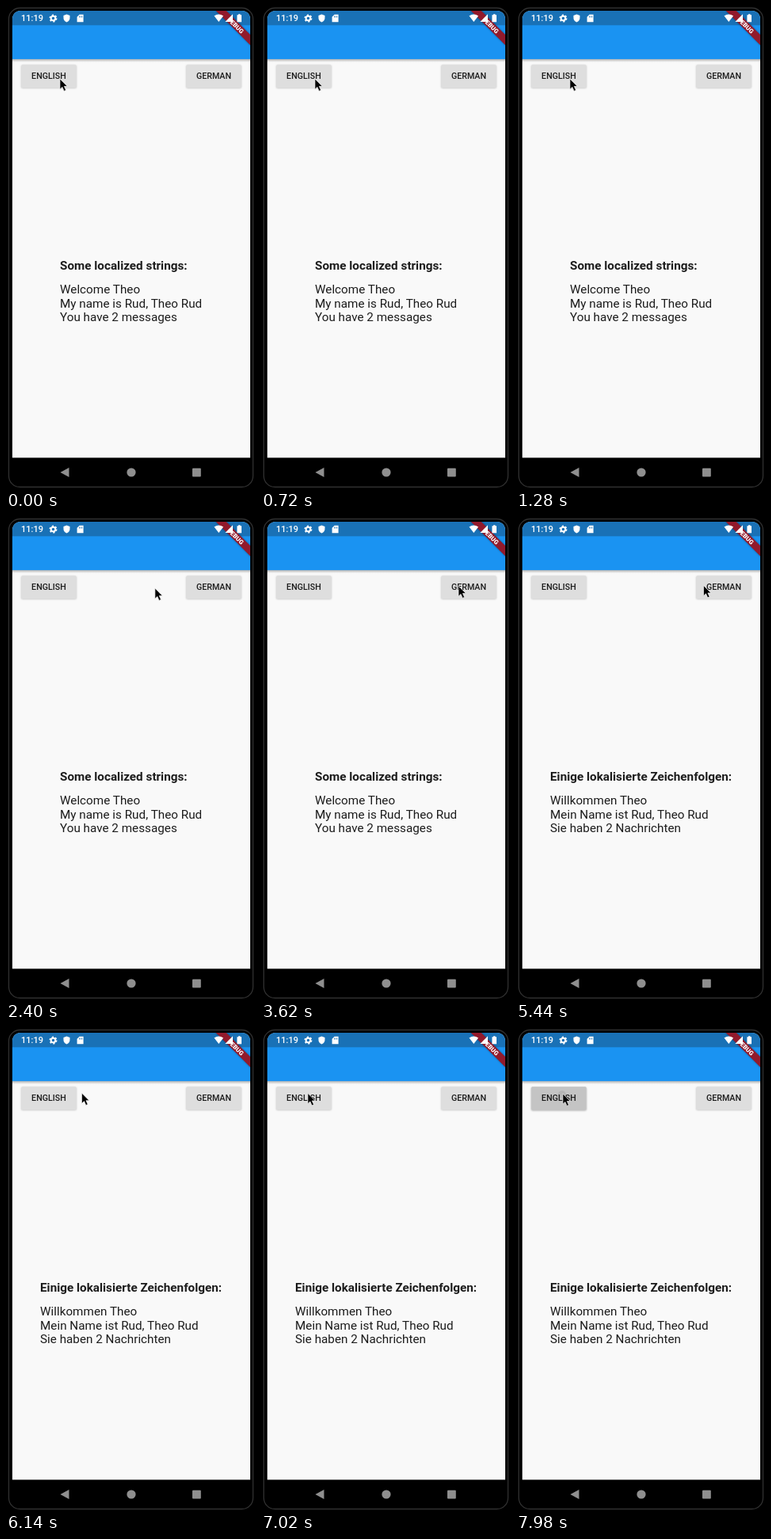
An HTML page for the animation above (8000 ms loop, 314 by 610 pixels).

```html
<!DOCTYPE html>
<html lang="en">
<head>
<meta charset="utf-8">
<style>
  html, body { margin: 0; width: 100%; height: 100%; overflow: hidden; background: #000; }
  svg { display: block; width: 314px; height: 610px; font-family: Roboto, sans-serif; }
  .label { font-size: 10.7px; font-weight: 500; fill: #1c1c1c; text-anchor: middle; }
  .body { font-size: 15.28px; fill: #1c1c1c; }
  .body .head { font-weight: 700; }
</style>
</head>
<body>
<svg viewBox="0 0 314 610">
  <defs>
    <clipPath id="screen"><path d="M8 570.6V18q0-12 12-12H296q12 0 12 12V570.6z"/></clipPath>
    <clipPath id="buttons"><path d="M19.3 74.2h69.4v29h-69.4zM227.3 74.2h69.4v29h-69.4z"/></clipPath>
    <linearGradient id="fall" x2="0" y2="1">
      <stop stop-color="#000" stop-opacity=".28"/><stop offset="1" stop-color="#000" stop-opacity="0"/>
    </linearGradient>
    <filter id="soft" x="-20%" y="-40%" width="140%" height="180%"><feGaussianBlur stdDeviation="1.1"/></filter>
  </defs>
  <rect width="314" height="610" fill="#000"/>
  <rect x="3.5" y="2.5" width="308" height="605" rx="14" fill="none" stroke="#303030" stroke-width="1.3"/>

  <g clip-path="url(#screen)">
    <rect x="8" y="6" width="300" height="565" fill="#f9f9f9"/>
    <rect x="8" y="67" width="300" height="4" fill="url(#fall)"/>
    <rect x="8" y="6" width="300" height="61.1" fill="#1a93f2"/>
    <rect x="8" y="6" width="300" height="18.3" fill="#1971b6"/>
  </g>

  <g id="pads"></g>
  <g clip-path="url(#buttons)" id="splashes"></g>
  <g class="label"><text x="54" y="92.4">ENGLISH</text><text x="262" y="92.4">GERMAN</text></g>
  <g class="body" id="strings">
    <text class="head" y="333.2"></text>
    <text y="363.3"></text>
    <text y="380.8"></text>
    <text y="398.3"></text>
  </g>

  <g clip-path="url(#screen)">
    <g transform="translate(308 6) rotate(45)">
      <rect x="-31" y="21.4" width="62" height="9.2" fill-opacity=".4" filter="url(#soft)"/>
      <rect x="-31" y="21.4" width="62" height="9.2" fill="#921a2c"/>
      <text y="28.9" text-anchor="middle" font-size="7.8" font-weight="900" fill="#fff">DEBUG</text>
    </g>
  </g>

  <g fill="#fff">
    <text x="19" y="19.4" font-size="11" font-weight="500">11:19</text>
    <circle cx="59.5" cy="15.5" r="2.8" fill="none" stroke="#fff" stroke-width="2"/>
    <circle cx="59.5" cy="15.5" r="4.2" fill="none" stroke="#fff" stroke-width="1.6" stroke-dasharray="2.2 2.2"/>
    <path d="M76.5 10.5l4 1.6v3q0 3.8-4 5.4q-4-1.6-4-5.4v-3z"/>
    <path d="M92.6 10.8h5v9.4h-8v-6.4z"/>
    <path d="M92.5 12.5v2m1.7-2v2m1.7-2v2" stroke="#1971b6" stroke-width=".8"/>
    <path d="M262.5 12.5q5.8-4.2 11.6 0l-5.8 7.5z"/>
    <path d="M286 10.3v9.7h-9.7z"/>
    <path d="M293 10.2h2.4v1h1.6v9h-5.6v-9h1.6z"/>
  </g>

  <g fill="#8f8f8f">
    <path d="M68.5 589l11-6v12z"/>
    <circle cx="158" cy="589" r="5.6"/>
    <rect x="235" y="583.7" width="10.8" height="10.8" rx="1"/>
  </g>

  <path id="cursor" d="M0 0V13.2L3 10.4L5.2 15.4L7.6 14.3L5.4 9.5H9.4z" fill="#000" stroke="#f4f4f4" stroke-width=".7"/>
</svg>
<script>
const LOOP = 8000, TO_GERMAN = 4560;
const clamp = v => Math.max(0, Math.min(1, v));
const ease = v => v * v * (3 - 2 * v);
const $ = id => document.getElementById(id);

const texts = {
  en: [68, 'Some localized strings:', 'Welcome Theo', 'My name is Rud, Theo Rud', 'You have 2 messages'],
  de: [43, 'Einige lokalisierte Zeichenfolgen:', 'Willkommen Theo', 'Mein Name ist Rud, Theo Rud', 'Sie haben 2 Nachrichten']
};

// Pointer stops: time, x, y
const stops = [
  [0, 68, 92], [1668, 68, 92], [2868, 249, 89], [3500, 249, 87], [3700, 249, 87],
  [4100, 254, 87], [5200, 254, 87], [6500, 59, 81], [7300, 59, 83], [LOOP, 59, 83]
];

// Button x, touch point, and its [down, up] times
const buttons = [
  { x: 19.3, touch: [58, 84], press: [7840, 8100] },
  { x: 227.3, touch: [254, 87], press: [4300, TO_GERMAN] }
];

function pointer(t) {
  const i = stops.findIndex(s => s[0] > t);
  const [a, b] = [stops[i - 1], stops[i]];
  const k = ease((t - a[0]) / (b[0] - a[0]));
  return [a[1] + (b[1] - a[1]) * k, a[2] + (b[2] - a[2]) * k];
}

function pressState(t, [down, up]) {
  return {
    level: clamp((t - down) / 120) * (1 - clamp((t - up - 100) / 300)),
    radius: Math.max(0, Math.min(t, up) - down) * .035 + Math.max(0, t - up) * .45,
    splash: clamp((t - down) / 80) * (1 - clamp((t - up) / 120))
  };
}

let shown;
function setLanguage(lang) {
  if (lang === shown) return;
  shown = lang;
  const [x, ...lines] = texts[lang];
  [...$('strings').children].forEach((el, i) => {
    el.setAttribute('x', x);
    el.textContent = lines[i];
  });
}

function draw(now) {
  const t = now % LOOP;
  let pads = '', splashes = '';
  for (const { x, touch, press } of buttons) {
    const { level, radius, splash } = pressState(t, press);
    const rect = (y, style) => `<rect x="${x}" y="${y}" width="69.4" height="29" rx="1.5" ${style}/>`;
    pads += rect(74.7 + level * .6, `fill-opacity="${.22 + level * .13}" filter="url(#soft)"`)
      + rect(74.2, 'fill="#dedede"')
      + rect(74.2, `fill="#c4c4c4" fill-opacity="${level}"`);
    splashes += `<circle cx="${touch[0]}" cy="${touch[1]}" r="${radius}" fill="#777" fill-opacity="${splash * .2}"/>`;
  }
  $('pads').innerHTML = pads;
  $('splashes').innerHTML = splashes;
  setLanguage(t < TO_GERMAN ? 'en' : 'de');
  $('cursor').setAttribute('transform', `translate(${pointer(t)})`);
}

let start;
function tick(now) {
  start ??= now;
  draw(now - start);
  requestAnimationFrame(tick);
}
draw(0);
requestAnimationFrame(tick);
</script>
</body>
</html>
```
